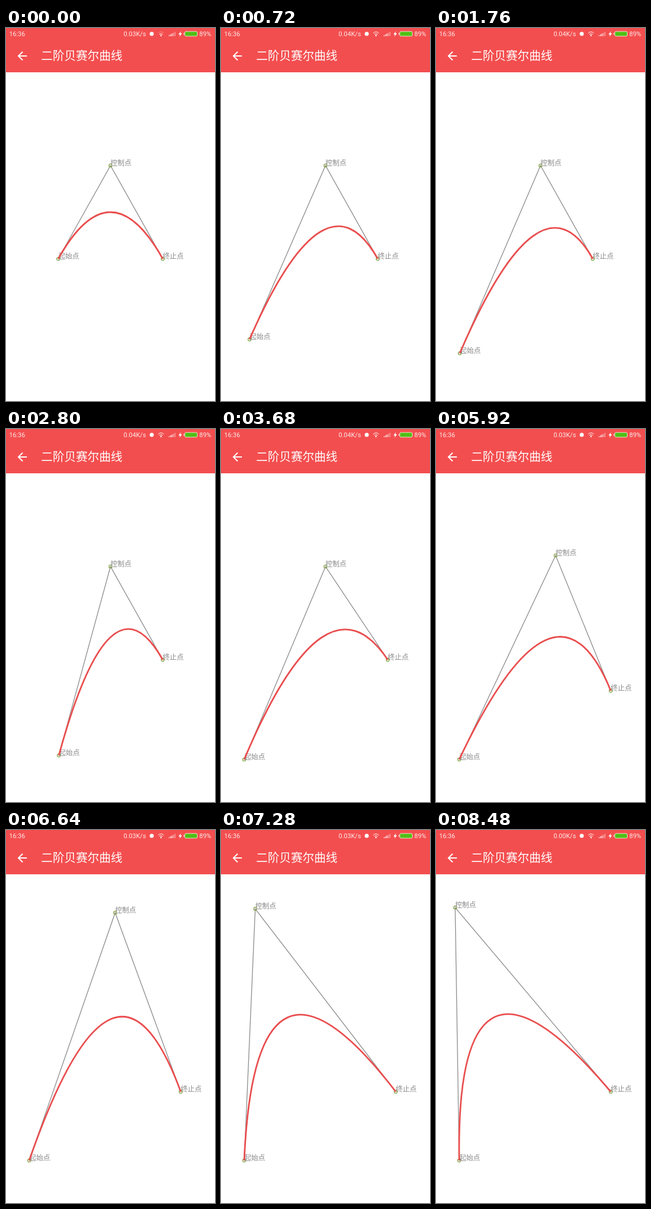
An HTML page that plays this animation: 360x640 px, repeating every 9120 ms.

```html
<!DOCTYPE html>
<html lang="zh">
<head>
<meta charset="utf-8">
<title>二阶贝赛尔曲线</title>
<style>
  html, body { margin: 0; width: 100%; height: 100%; overflow: hidden; background: #fff; }
  svg { display: block; width: 360px; height: 640px; }
  text { font-family: "Noto Sans CJK SC", "Noto Sans CJK", sans-serif; }
  .status text { font: 11px Roboto, sans-serif; fill: #fff; fill-opacity: .88; }
  .label { font-size: 12px; fill: #888; }
  .stroke { fill: none; stroke: #fff; stroke-linecap: round; }
</style>
</head>
<body>
<svg viewBox="0 0 360 640">
  <polyline id="guide" fill="none" stroke="#8b8b8b" stroke-width="1.3"/>
  <g id="points"></g>
  <path id="curve" fill="none" stroke="#e94e4f" stroke-width="2.8"/>

  <rect width="360" height="76" fill="#f34e4f"/>
  <path transform="translate(16 36)" fill="#fff"
    d="M20 11H7.83l5.59-5.59L12 4l-8 8 8 8 1.41-1.41L7.83 13H20z"/>
  <text x="60.5" y="55" font-size="20" fill="#fff">二阶贝赛尔曲线</text>

  <g class="status">
    <text x="5.5" y="14">16:36</text>
    <text id="speed" x="202.5" y="14"></text>
    <text x="333" y="14">89%</text>
    <circle cx="251" cy="10" r="3.5" fill="#fff"/>
    <path id="wifiOuter" class="stroke" d="M262.5 8.5q4.5-4 9 0"/>
    <path class="stroke" d="M264.3 10.8q2.7-2.3 5.4 0"/>
    <circle cx="267" cy="13" r="1.2" fill="#fff"/>
    <path class="stroke" stroke-width="1.3" d="M281 13.5v-.5M283.5 13.5v-2M286 13.5v-3.5"/>
    <path class="stroke" stroke-width="1.2" opacity=".6" d="M288.5 13.5v-5M291 13.5v-6.5"/>
    <path fill="#fff" d="M301.5 5.5l-4.5 5.5h2.7l-1.2 4 4.8-5.8h-2.9z"/>
    <rect x="308" y="6" width="21.5" height="8" rx="2" fill="#51bf16" stroke="#fff" stroke-opacity=".75"/>
    <path class="stroke" stroke-opacity=".8" d="M306.5 8.5v3"/>
  </g>
</svg>
<script>
  const LOOP = 9120, STEP = 80;
  const byId = id => document.getElementById(id);

  // Drag paths: [time, x, y]
  const paths = {
    start: [[0, 90, 396], [480, 66, 490], [1040, 34, 569], [1680, 34, 569], [1760, 41, 558],
            [2260, 282, 545], [2800, 91, 560], [3120, 40, 567]],
    control: [[5840, 180, 236], [5920, 206, 217], [6240, 283, 180], [6640, 188, 142],
              [7200, 70, 136], [7680, 33, 133]],
    end: [[3520, 270, 396], [3920, 319, 398], [4400, 284, 413], [4720, 280, 448],
          [5040, 314, 464], [5360, 301, 449]]
  };
  const names = { start: '起始点', control: '控制点', end: '终止点' };
  const speeds = [[0, '0.03'], [560, '0.04'], [4560, '0.03'], [8480, '0.00']];

  // Slope at a key: zero at the ends, at pauses and where the direction turns.
  function slope(keys, i, axis) {
    if (!i || i === keys.length - 1) return 0;
    const before = keys[i][axis] - keys[i - 1][axis];
    const after = keys[i + 1][axis] - keys[i][axis];
    return before * after <= 0 ? 0 : (before + after) / (keys[i + 1][0] - keys[i - 1][0]);
  }

  function positionAt(keys, time) {
    const last = keys.length - 1;
    if (time <= keys[0][0]) return keys[0].slice(1);
    if (time >= keys[last][0]) return keys[last].slice(1);
    const i = keys.findIndex(key => key[0] > time) - 1;
    const span = keys[i + 1][0] - keys[i][0];
    const u = (time - keys[i][0]) / span, v = 1 - u;
    return [1, 2].map(axis =>
      keys[i][axis] * v * v * (1 + 2 * u) + keys[i + 1][axis] * u * u * (3 - 2 * u) +
      span * u * v * (slope(keys, i, axis) * v - slope(keys, i + 1, axis) * u));
  }

  byId('points').innerHTML = Object.keys(names).map(id =>
    `<g id="${id}"><circle r="2.7" fill="none" stroke="#8aa84c" stroke-width="1.3"/>` +
    `<text class="label">${names[id]}</text></g>`).join('');

  function draw(time) {
    const [start, control, end] = Object.keys(paths).map(id => {
      const point = positionAt(paths[id], time);
      byId(id).setAttribute('transform', `translate(${point})`);
      return point;
    });
    byId('guide').setAttribute('points', [start, control, end].join(' '));
    byId('curve').setAttribute('d', `M${start}Q${control} ${end}`);
    byId('speed').textContent = speeds.filter(s => s[0] <= time).pop()[1] + 'K/s';
    byId('wifiOuter').setAttribute('opacity', time < 560 ? .35 : 1);
  }

  const origin = performance.now();
  function tick() {
    const time = (performance.now() - origin) % LOOP;
    draw(Math.floor(time / STEP) * STEP);
    requestAnimationFrame(tick);
  }
  tick();
</script>
</body>
</html>
```
